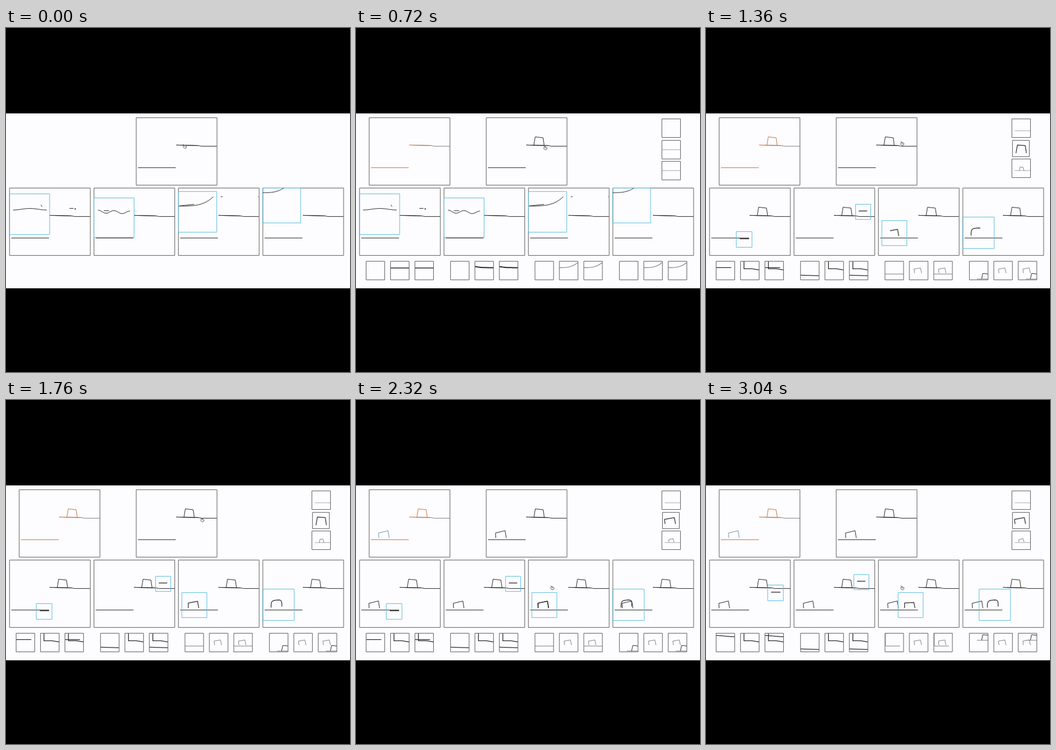
An HTML page with a canvas that plays this animation: 592 px wide and 592 px high, repeating every 3120 ms.

```html
<!DOCTYPE html>
<html>
<head>
<meta charset="utf-8">
<title>Sketch suggestions</title>
<style>
html, body { margin: 0; width: 100%; height: 100%; overflow: hidden; background: #000; }
canvas { display: block; }
</style>
</head>
<body>
<canvas id="stage" width="592" height="592"></canvas>
<script>
const ctx = document.getElementById('stage').getContext('2d');
const LOOP = 3120, STEP = 80;
const INK = '#2c2c2c', GREY = '#858585', PALE = '#aaa';
const BLUE = '#5fbfe0', ORANGE = '#c87842', TEAL = '#6b9bb3';
const PITCH = 145.3, CELL = 32;

// Moments at which the interface changes
const THUMBS = 160, DRAWN = 600, COMMIT = 800, SUGGEST = 1120, ACCEPT = 2240, RENEW = 2640;
const DRAW_TIME = 350;

const ramp = (t, a, b) => Math.max(0, Math.min(1, (t - a) / (b - a)));
const ease = p => p * p * (3 - 2 * p);
const mix = (a, b, p) => a + (b - a) * p;

// Samples y = f(u) for u from 0 to 1 between x0 and x1
const curve = (x0, x1, f, n = 20) =>
  Array.from({ length: n + 1 }, (_, i) => [mix(x0, x1, i / n), f(i / n)]);

// Hand-drawn block: two legs and a tilted roof
const block = (x, y, w, h, lean, tilt) =>
  [[x, y], [x + lean, y - h], [x + w - 2, y - h + tilt], [x + w, y]];

// Block with rounded shoulders
const arch = (cx, y, rx, h, tilt) => Array.from({ length: 17 }, (_, i) => {
  const a = Math.PI * i / 16, c = Math.cos(a);
  const dx = -rx * Math.sign(c) * Math.sqrt(Math.abs(c));
  return [cx + dx, y - h * Math.sqrt(Math.sin(a)) - tilt * dx];
});

// The first part p of a polyline, measured by length
function along(pts, p) {
  const lens = pts.slice(1).map((q, i) => Math.hypot(q[0] - pts[i][0], q[1] - pts[i][1]));
  let left = lens.reduce((a, b) => a + b, 0) * Math.min(1, p);
  const out = [pts[0]];
  for (let i = 0; i < lens.length && left > 0; i++) {
    const k = Math.min(1, left / lens[i]);
    out.push(pts[i].map((v, j) => mix(v, pts[i + 1][j], k)));
    left -= lens[i];
  }
  return out;
}

function line(pts, color = INK, width = 1) {
  ctx.strokeStyle = color;
  ctx.lineWidth = width;
  ctx.beginPath();
  pts.forEach(([x, y]) => ctx.lineTo(x, y));
  ctx.stroke();
}

const dash = (x0, x1, y, color, width) => line([[x0, y], [x1, y]], color, width);

function box(w, h = w, color = '#606060') {
  ctx.strokeStyle = color;
  ctx.lineWidth = 1;
  ctx.strokeRect(0, 0, w, h);
}

function at(x, y, draw) {
  ctx.save();
  ctx.translate(x, y);
  draw();
  ctx.restore();
}

function panel(x, y, w, h, draw) {
  at(x, y, () => {
    ctx.save();
    ctx.beginPath();
    ctx.rect(0, 0, w, h);
    ctx.clip();
    draw();
    ctx.restore();
    box(w, h);
  });
}

const bigPanel = (x, y, draw) => panel(x, y, 139, 116, draw);
const cell = (x, y, draw) => panel(x, y, CELL, CELL, draw);

const shelf = [[69, 47], [107, 48], [112, 49], [139, 49]];
const upperBlock = block(82, 48, 18, 15, 2.5, 1.5);
const lowerBlock = block(16.5, 83, 18, 8.5, -0.5, -4);

function sketch(t, main = INK, rest = INK, added = INK) {
  dash(3, 68, 86, main);
  line(shelf, rest);
  line(shelf.slice(0, 2), main);
  if (t >= COMMIT) line(upperBlock, main);
  if (t >= ACCEPT) line(lowerBlock, added);
}

const firstHints = [
  () => {
    at(0, 10, () => box(69, 70, BLUE));
    line(curve(6, 64, u => 36.5 + 1.3 * Math.cos(2 * Math.PI * u)));
    line([[54, 29], [56, 32]]);
    dash(103, 110, 35);
    dash(112, 114, 36, INK, 2);
  },
  () => {
    at(0, 17, () => box(69, 68, BLUE));
    line(curve(7, 62, u => 40.5 + 1.5 * u - 2.5 * Math.cos(4 * Math.PI * u)));
    dash(17, 26, 39);
    dash(72, 73, 40, PALE);
  },
  () => {
    at(0, 6, () => box(66, 70, BLUE));
    line(curve(1, 60, u => 31 - 16 * u ** 3.5));
    line([[1, 31], [27, 28]]);
    dash(73, 76, 15);
    dash(137, 138, 15);
  },
  () => {
    box(65, 60, BLUE);
    line(curve(0, 36, u => 8 - 8 * u ** 3));
  }
];

const hint = (x, y, size, draw) => at(x, y, () => {
  box(size, size, BLUE);
  draw();
});

// Later hints keep their form and move to a new place
const laterHints = [
  moved => hint(moved ? 100 : 46, moved ? 43 : 75, 27, () => dash(6, 22, 12.3, INK, 1.3)),
  moved => hint(moved ? 103 : 106, moved ? 25 : 28, 26, () => dash(5.5, 20, 11.5, INK, 1.3)),
  (moved, p) => hint(moved ? 34 : 6, 56, 43, () =>
    line(along(block(11, 26.5, 18, 8.5, 0, moved ? -1 : -3).reverse(), p), INK, 1.2)),
  (moved, p) => hint(moved ? 28 : 0, 50, 54, () =>
    line(along(arch(23.5, 31, 9.3, 12, 0.1), p), INK, 1.2))
];

function hints(t, i) {
  if (t < SUGGEST) return firstHints[i]();
  const moved = t >= RENEW, from = moved ? RENEW : SUGGEST;
  laterHints[i](moved, ramp(t, from, from + DRAW_TIME));
}

// Thumbnail contents
const corner = () => line([[6, 0], [6, 13], [20, 13], [CELL, 15]], INK, 1.3);
const smallBlock = () => line(block(9, 20.5, 12, 7, -1, -2), GREY);
const nothing = () => {};
const bow = () => line(curve(0, CELL, u => 11 - 9 * u ** 3), GREY, 1.2);
const farBlock = y => {
  dash(13, CELL, y, GREY);
  line(block(21, y, 14, 9.5, 2, 1));
};

function thumbPairs(t) {
  if (t < SUGGEST) return [
    [nothing, () => dash(0, CELL, 11.5, INK, 1.5)],
    [nothing, () => line(curve(0, CELL, u => 11 - 2 * (1 - u) ** 4), INK, 2)],
    [nothing, bow],
    [nothing, bow]
  ];
  const moved = t >= RENEW;
  return [
    [() => moved ? line(curve(0, CELL, u => 4 + 2 * ease(u)), INK, 1.2) : dash(0, 26, 11, INK, 1.2), corner],
    [() => line([[0, moved ? 27 : 24], [CELL, moved ? 28 : 25]], INK, 1.2), corner],
    [() => moved ? line([[1, 0], [1, 22], [26, 22]], GREY) : dash(0, CELL, 22, GREY), smallBlock],
    [() => farBlock(moved ? 12 : 30.5), smallBlock]
  ];
}

function thumbs(t) {
  thumbPairs(t).forEach(([a, b], i) =>
    [[a], [b], [a, b]].forEach((parts, k) =>
      cell(17 + i * PITCH + k * 42, 401, () => parts.forEach(draw => draw()))));
}

function sideThumbs(t) {
  const ground = y => dash(5, CELL, y, PALE);
  if (t < COMMIT) {
    cell(526, 156, nothing);
    [193, 229].forEach(y => cell(526, y, () => dash(0, CELL, 16, PALE)));
    return;
  }
  const lower = t >= ACCEPT;
  cell(526, 156, () => ground(20.5));
  panel(527, 193, 29, 28, () =>
    line(lower ? block(4.5, 20, 18, 8, -1, -3) : block(6, 22, 18, 14, 2.5, 1), INK, 1.2));
  cell(526, 225, () => {
    ground(20);
    line(lower ? block(12, 19, 9, 4, 0, -2) : block(13, 20, 8, 6, 1, 0), GREY);
  });
}

const trace = upperBlock.map(([x, y]) => [x + 223.5, y + 154]);

function pointer(t) {
  if (t < DRAWN) return along(trace, ramp(t, STEP, DRAWN) + 0.06).pop();
  const wander = 12 * ease(ramp(t, 720, 1360));
  const lift = 8 * Math.sin(Math.PI * ramp(t, 720, 1760));
  const drop = 117 * ease(ramp(t, 1760, 2080));
  return [324 + wander, 202 - lift + drop];
}

function hand([x, y]) {
  at(x, y, () => {
    ctx.fillStyle = '#f4f4f4';
    ctx.strokeStyle = '#555';
    ctx.lineWidth = 0.9;
    ctx.beginPath();
    ctx.ellipse(1.5, 4.5, 3, 2.6, 0.5, 0, 7);
    ctx.fill();
    ctx.stroke();
    line([[-1, 0], [0.5, 3], [3, 4.5]], '#555', 0.9);
  });
}

function render(t) {
  ctx.setTransform(1, 0, 0, 1, 0, 0);
  ctx.fillStyle = '#000';
  ctx.fillRect(0, 0, 592, 592);
  ctx.fillStyle = '#fdfcfe';
  ctx.fillRect(0, 147, 592, 301);
  ctx.translate(0.4, 0.4);
  ctx.lineJoin = 'round';

  bigPanel(223.7, 154, () => sketch(t));
  if (t > STEP && t < COMMIT) line(along(trace, ramp(t, STEP, DRAWN)));

  for (let i = 0; i < 4; i++) {
    const x = 5.7 + i * PITCH;
    bigPanel(x, 275, () => sketch(t));
    at(x, 275, () => hints(t, i));
  }

  if (t >= THUMBS) {
    bigPanel(22.3, 154, () => sketch(t, ORANGE, GREY, TEAL));
    thumbs(t);
    sideThumbs(t);
  }

  const tip = pointer(t);
  if (t >= THUMBS && t < DRAWN) {
    ctx.strokeStyle = '#111';
    ctx.lineWidth = 1.5;
    ctx.beginPath();
    ctx.arc(tip[0], tip[1], 13, 0, 7);
    ctx.stroke();
  }
  hand(tip);
}

const start = performance.now();
function tick() {
  const t = (performance.now() - start) % LOOP;
  render(Math.floor(t / STEP) * STEP);
  requestAnimationFrame(tick);
}
tick();
</script>
</body>
</html>
```
